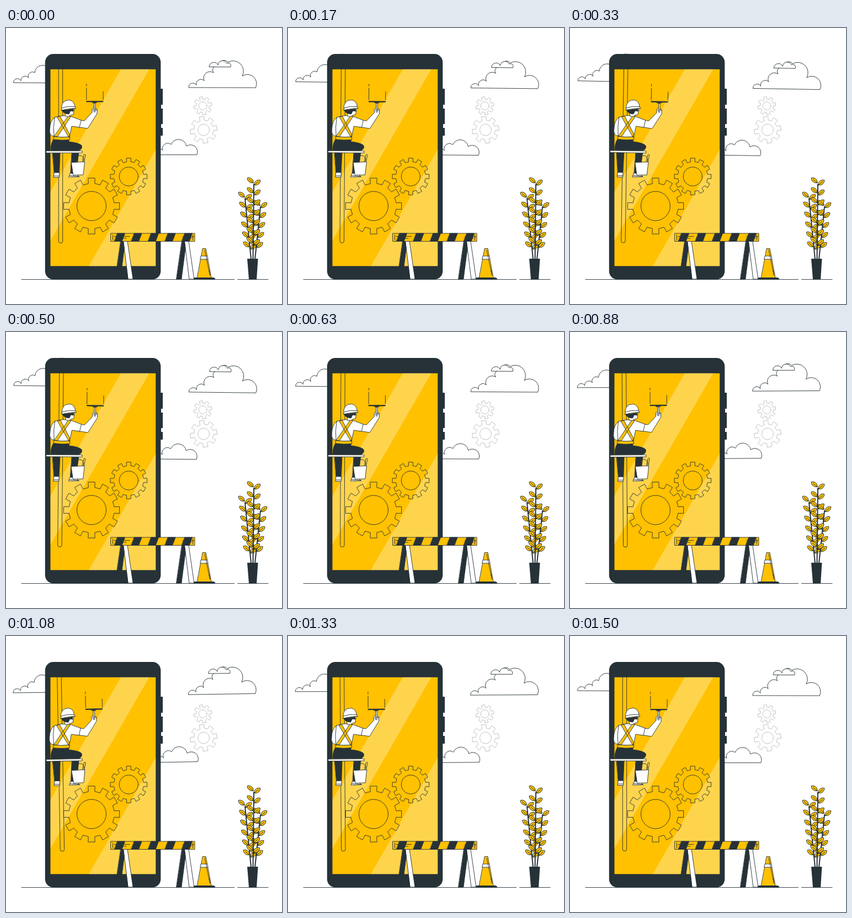
Animation, 500 px wide and 500 px high, one loop 1.54 s. Source, as an HTML page:

```html
<!DOCTYPE html>
<html lang="en">
<head>
<meta charset="utf-8">
<title>App maintenance</title>
<style>
  html, body { margin: 0; width: 100%; height: 100%; overflow: hidden; background: #fff; }
  svg { display: block; width: 100%; height: 100%; }
  .line { fill: none; stroke: #263238; stroke-width: .9; stroke-linecap: round; stroke-linejoin: round; }
  .white { fill: #fff; }
  .gold { fill: #ffc100; }
  .dark { fill: #263238; }
  .pale { stroke: #b3b3b3; stroke-width: .8; }
  .stem { stroke-width: 2; }
</style>
</head>
<body>
<svg viewBox="0 0 500 500">
  <g id="clouds"></g>

  <!-- phone -->
  <rect class="dark" x="70.800" y="47" width="209.500" height="408.500" rx="15"/>
  <path class="dark" d="M279 110h5V139h-3V146h3V174h-3V181h3V195h-5Z"/>
  <rect class="gold" x="80.500" y="74.800" width="190.700" height="356.500"/>
  <path fill="#fff" fill-opacity=".3" d="M208 74.800H259.500L80.500 385V297ZM271.200 220V431.300H150Z"/>
  <g id="gears"></g>

  <g id="worker" class="line">
    <path d="M95.300 48V386a3.700 3.700 0 0 0 7.400 0V48Z"/>
    <path d="M145.800 101.500v3.500M145.800 109V130M176 115V130"/>
    <!-- legs and seat -->
    <path class="dark" d="M84.500 225H98L96.500 263H87.500ZM119.500 224H132L127 265H117Z"/>
    <path class="white" d="M87.500 262H96.500V270.500H86.500ZM117 263L126 264L133 269.500L114 270Z"/>
    <path d="M87 268H96.500M115 267.500L132 268.500"/>
    <path class="dark" d="M86 202Q81 209 81 222H132Q139 219 137 213Q133 208 114 206V202Z"/>
    <!-- arms and shirt -->
    <path class="white" d="M87 163Q80 169 79.500 181Q77 197 88 196L92 177Z"/>
    <path class="white" d="M133 167L142 168L156 153V147L159 144.500L165 147V155L148 182L128 179Z"/>
    <path class="white" d="M88 162Q102 157 117 160L136 167L133 180L119 178L115 198H87Q85 179 88 162Z"/>
    <path class="gold" d="M93 161.500L98 160L115 192L114 198ZM113 159.500L117.500 160.500L93 197H87ZM87 196.500Q101 199 115.500 197V202.500Q101 204 86 202Z"/>
    <!-- head -->
    <path class="white" d="M106 151L108 160Q113 162 117 158L122 157L124 146Z"/>
    <path class="dark" d="M101 149L122 147V151L117 150L114 156Q105 156 101 149Z"/>
    <path class="white" d="M100.500 149Q99 130 115 130.500Q124 132 125 143L127 145.500Q116 145.500 100.500 149ZM101 145Q112 141 125 142.500"/>
    <!-- squeegee -->
    <path class="dark" d="M146 132.500H176V133.800H146ZM156 134.500H165L162 136H159Z"/>
    <path class="white" d="M159.700 136H161.700V152H159.700ZM158 149L162 147.500L165 149"/>
    <!-- plank and bucket -->
    <path class="white" d="M73 222.700H138V226.200H73Z"/>
    <path d="M120.500 244Q122 232 132 231T141 243M138 244L141 230Q143 227 144 230L141 244"/>
    <path class="white" d="M118.500 243.500L142.500 242.500L140 266L122 266.500Z"/>
  </g>

  <path class="line" d="M28 455.500H413.500M419.500 455.500H475"/>

  <!-- barricade -->
  <g class="line">
    <g id="legs">
      <path class="dark" d="M208 386h8L207 455h-9Z"/>
      <path class="white" d="M213 386h7L230 455h-8.500Z"/>
    </g>
    <use href="#legs" x="110.800"/>
    <rect class="gold" x="190" y="372" width="152" height="14.500"/>
    <path id="stripes" class="dark"/>
    <path d="M193.500 375V384M196 377.500H224M202 381H218M338.500 375V384M320 378H341M323 381H336"/>
  </g>

  <!-- cone -->
  <g class="line">
    <path class="gold" d="M356.500 399.500H362L372 452.500H346.500Z"/>
    <path class="white" d="M353.500 413H364.500L366 419H352Z"/>
    <path d="M360 402L369 446M368 439L369.500 448"/>
    <path class="dark" d="M340 455Q340 452.500 342 452.500H376Q378.500 452.500 378.500 455Z"/>
  </g>

  <g id="plant"></g>
  <path class="dark" d="M437 418H456.500L454 455.500H440Z"/>
</svg>
<script>
const $ = id => document.getElementById(id);

function add(parent, tag, attrs) {
  const node = document.createElementNS('http://www.w3.org/2000/svg', tag);
  for (const key in attrs) node.setAttribute(key, attrs[key]);
  $(parent).append(node);
}

// Round bumps from joint to joint, closed by a straight base
function cloud(...joints) {
  const bumps = joints.slice(1).map(([x, y], i) => {
    const r = .52 * Math.hypot(x - joints[i][0], y - joints[i][1]);
    return `A${r} ${r} 0 0 1 ${x} ${y}`;
  });
  add('clouds', 'path', { class: 'line white', d: `M${joints[0]}${bumps.join('')}Z` });
}
cloud([13.5, 98.7], [27, 95.5], [41, 90.5], [52, 81], [79, 75], [80, 99.3]);
cloud([270, 229.3], [284, 221.5], [299, 211], [327, 214], [346, 229.3]);
cloud([331, 107.5], [345, 103.5], [359, 95.5], [376, 81], [386, 69], [402, 62], [428, 87], [452.5, 107.8]);
cloud([368, 70], [384, 67], [400, 64], [407, 70.3]);

function gear(cx, cy, size, root, hole, teeth, turn, cls) {
  const pitch = 2 * Math.PI / teeth, points = [];
  const corner = (r, a) => points.push([cx + r * Math.sin(a), cy - r * Math.cos(a)]);
  for (let i = 0; i < teeth; i++) {
    const a = i * pitch + turn;
    corner(size * root, a - pitch * .27);
    corner(size, a - pitch * .23);
    corner(size, a + pitch * .23);
    corner(size * root, a + pitch * .27);
  }
  add('gears', 'polygon', { points: points.join(' '), class: cls });
  add('gears', 'circle', { cx, cy, r: size * hole, class: cls });
}
gear(155, 322.5, 51, .81, .52, 12, 0, 'line');
gear(222.3, 269, 33.5, .81, .51, 12, 0, 'line');
gear(358, 184.5, 24.5, .72, .43, 8, -.15, 'line pale');
gear(356.5, 141, 16.5, .72, .45, 8, -.2, 'line pale');

let stripes = '';
for (let x = 202; x < 340; x += 30.5) stripes += `M${x} 372h13.500l-5.500 14.500h-13.500Z`;
$('stripes').setAttribute('d', stripes);

// A straight stem with mirrored leaves every few pixels down from its tip
function branch(baseX, tipX, tipY, pairs) {
  add('plant', 'path', { class: 'line stem', d: `M${baseX} 419L${tipX} ${tipY}` });
  for (let i = 0; i < pairs; i++) {
    const y = tipY + i * 18;
    const x = tipX + (baseX - tipX) * (y - tipY) / (419 - tipY);
    for (const side of [-1, 1]) {
      add('plant', 'path', {
        class: 'line gold',
        transform: `translate(${x} ${y + side * 2}) scale(${side} 1) rotate(-38)`,
        d: 'M1 0Q5-5 10-3.500Q14-2.500 15 0Q13 3 9 3.500Q4 4 1 0H11'
      });
    }
  }
}
branch(444, 433, 309, 6);
branch(451, 461, 324, 5);
branch(447.5, 449, 283, 7);

// Triangle wave of one degree over 1.5 s at 24 fps, then one frame of rest
function draw(now) {
  const phase = (Math.floor((now % 1540 + 4) * .024) + .5) / 36 % 1;
  const wave = 1 - 4 * Math.abs((phase + .25) % 1 - .5);
  const angle = wave - 1 / 18;
  $('clouds').setAttribute('transform', `rotate(${angle} 233 143)`);
  $('worker').setAttribute('transform', `rotate(${angle} 125 218.500)`);
}
function tick() {
  draw(performance.now());
  requestAnimationFrame(tick);
}
tick();
</script>
</body>
</html>
```
